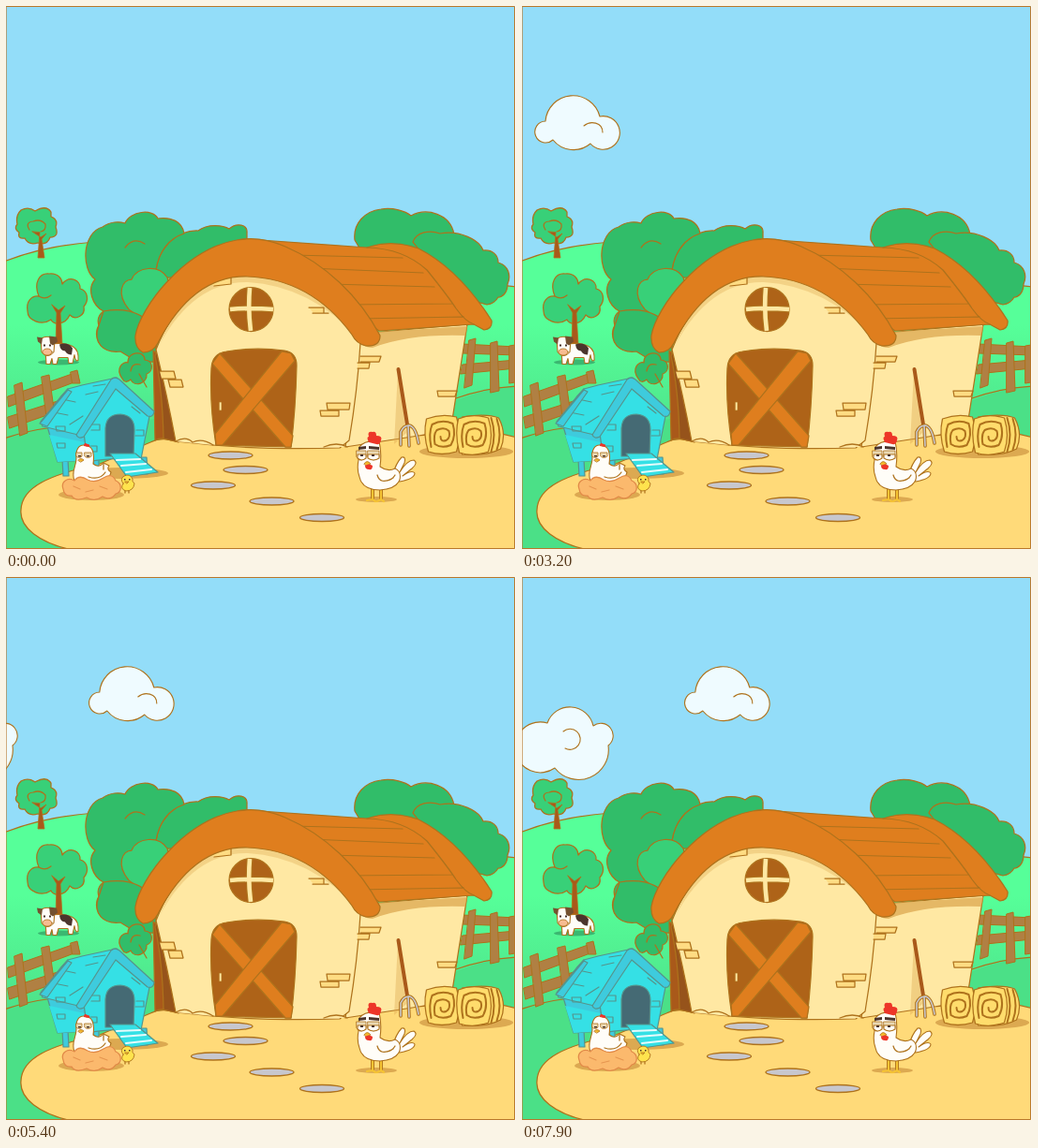
Write an HTML page that moves like this. It is 544x580 px and loops after 8 s.

```html
<!DOCTYPE html>
<html lang="en">
<head>
<meta charset="utf-8">
<title>Farm</title>
<style>
html, body { margin: 0; height: 100%; overflow: hidden; background: #93ddf9; }
svg { display: block; width: 100vw; height: 100vh; stroke: #ae721c; stroke-width: 1.25; stroke-linejoin: round; stroke-linecap: round; fill: none; }
.flat { stroke: none; }
.cloud { fill: #effbff; stroke-width: 1.1; }
.leaf { fill: #31bd69; }
.light { fill: #38d078; }
.wood { fill: #b08043; stroke-width: 1; }
.trunk { fill: #a9591a; }
.wall { fill: #ffe8a3; }
.brick { fill: #ffdc83; }
.roof { fill: #df7e1e; }
.dark { fill: #ae6318; }
.shade { fill: #dca951; stroke: none; }
.stone { fill: #c7c7ce; stroke-width: 1.4; }
.hay { fill: #ffdc6c; }
.white { fill: #fffdf8; stroke-width: 1.1; }
.coop { stroke: #55948c; stroke-width: 1.2; }
.aqua { fill: #35e0e5; }
.teal { fill: #3ecbdd; }
.red { fill: #ed3528; stroke: none; }
.beak { fill: #f5b82d; stroke-width: .8; }
.ink { fill: #4b352d; stroke: none; }
.lid { fill: #ead9b4; stroke-width: .8; }
</style>
</head>
<body>
<svg viewBox="0 0 544 580">
  <defs>
    <linearGradient id="hill" x1="0" y1="340" x2="0" y2="460" gradientUnits="userSpaceOnUse">
      <stop stop-color="#56ff99"/><stop offset="1" stop-color="#4ee28a"/>
    </linearGradient>
  </defs>
  <rect class="flat" width="544" height="580" fill="#93ddf9"/>

  <g id="near" class="cloud">
    <path d="M25 123A29.5 29.5 0 0 1 83 118A17.8 17.8 0 1 1 73 147A28 28 0 0 1 33 143A11.5 11.5 0 1 1 25 123Z"/>
    <path d="M66 128C73 122 86 124 86 135"/>
  </g>
  <g id="far" class="cloud">
    <path d="M27 156A25.5 25.5 0 0 1 76 159A12.7 12.7 0 1 1 92 180A32 32 0 0 1 35 204A27 27 0 1 1 27 156Z"/>
    <path d="M44 165A11 11 0 1 1 46 183"/>
  </g>

  <!-- hills -->
  <path fill="url(#hill)" d="M-2 273Q40 256 95 252L544 300V590H-2Z"/>
  <path fill="#4be087" d="M-2 462Q20 454 50 450L170 440V590H-2ZM470 425Q510 408 546 406V480H470Z" class="flat"/>
  <path d="M-2 462Q20 454 50 450M480 419Q510 408 546 406"/>

  <!-- small trees -->
  <path class="light" d="M14 242Q8 238 12 233Q10 224 16 218Q24 214 31 219Q43 212 48 220L48 225Q56 228 53 236Q57 247 47 247Q44 256 34 253Q24 256 20 248Q12 249 14 242Z"/>
  <path d="M25 239Q20 231 29 230Q37 227 42 233Q43 240 37 241"/>
  <path class="trunk" d="M36 242L34 269H41L38 249L43 243L37 247L28 241Z" stroke-width=".8"/>
  <path class="light" d="M35 310C29 295 36 285 46 286C56 285 60 292 60 297C68 287 80 293 79 302C87 304 89 314 83 321C85 331 74 336 68 330C63 341 51 341 48 335C38 342 23 336 23 326C21 316 27 309 35 310Z"/>
  <path d="M35 310Q42 314 48 309"/>
  <path class="trunk" d="M54 328L53 362H60L58 328L63 320L56 325L49 319Z" stroke-width=".8"/>

  <!-- bushes -->
  <path class="leaf" d="M160 282C163 256 185 239 205 240C215 232 232 234 238 238C246 231 258 233 257 243V290H160Z"/>
  <path class="leaf" d="M104 326C92 320 86 302 95 292C80 281 81 242 103 236C111 230 121 230 127 232C132 219 157 216 162 227C176 225 188 230 190 243C174 248 163 262 160 282V365H120C100 372 92 352 99 341Q96 332 104 326Z"/>
  <path d="M127 258Q136 246 148 254"/>
  <path class="light" d="M131 324C117 307 124 292 134 292C140 278 163 276 172 290L180 320L150 350Q142 330 131 324Z"/>
  <path class="leaf" d="M99 341C92 360 104 371 122 369L140 380H160V345Q140 319 104 326Z"/>
  <path class="leaf" d="M124 398C116 387 125 379 130 381C129 369 148 367 148 378C158 379 157 391 150 393C151 403 137 408 133 399Q127 404 124 398Z"/>
  <path d="M133 390Q134 381 143 383M142 393L150 407"/>
  <path class="leaf" d="M372 250C370 232 383 219 400 217C413 215 426 219 432 224C449 215 474 222 478 244L460 280H390Z"/>
  <path class="leaf" d="M434 252C438 241 452 239 463 243C484 239 505 250 509 261C519 260 525 266 525 274C536 277 539 288 535 297C535 307 529 311 525 311Q521 318 513 319L480 310Z"/>

  <!-- fences -->
  <g class="wood">
    <path d="M2 417L76 391L78 400L3 428ZM2 439L58 421V432L4 451Z"/>
    <path d="M9 405L17 402L23 456L15 459ZM38 396L46 394L51 430L43 436ZM69 391L76 389L79 403H71Z"/>
    <path d="M487 361L544 364V373L487 371ZM487 383L544 378V387L485 393Z"/>
    <path d="M494 357L501 355L497 405L489 408ZM517 360L524 358L526 411L517 413ZM537 363L543 362V402L537 403Z"/>
  </g>

  <!-- cow -->
  <g transform="translate(0 1.5)">
    <ellipse class="flat" cx="56" cy="379" rx="22" ry="3" fill="#3bb771"/>
    <path class="white" d="M46 360Q60 357 71 362Q78 366 77 377Q74 379 73 371L71 380H67L66 374H56L54 381H50L49 375L47 381H43L42 366Z"/>
    <path class="ink" d="M57 360Q66 357 71 364L70 371Q65 371 63 367Q58 367 57 360Z"/>
    <path class="white" d="M37 354Q45 349 52 355L51 368Q44 376 38 368Z"/>
    <path fill="#74512f" class="flat" d="M33 352L39 353L38 360L34 357ZM46 351L54 352L55 357L50 361L47 359Z"/>
    <ellipse cx="44" cy="368" rx="5" ry="3.5" fill="#f7bc91" stroke-width=".8"/>
    <path class="ink" d="M40 360h2v2h-2zM46 360h2v2h-2z"/>
  </g>

  <!-- ground -->
  <path fill="#ffda79" d="M75 582C34 574 14 556 16 538C17 514 45 501 100 489L154 466Q166 460 181 465L365 462L478 445L546 461V582Z"/>

  <!-- barn -->
  <path class="trunk" d="M157 368L165 375L176 464Q166 460 159 464Z"/>
  <path fill="#96531b" d="M161 368L184 466L168 462Q167 410 159 374Z"/>
  <path class="wall" d="M378 350L492 340L476 442Q463 457 440 459L362 471Z"/>
  <path class="shade" d="M379 358L398 348L492 342L490 352Q430 350 391 365Q378 364 379 358Z" opacity=".75"/>
  <path class="wall" d="M160 367Q192 287 257 288Q341 292 378 360Q375 410 366 464L356 472Q275 474 220 469L181 465Q172 417 160 367Z"/>
  <path class="shade" d="M164 361Q195 290 257 289Q336 294 376 355Q325 299 258 295Q201 294 164 361Z" opacity=".35"/>
  <path class="wall" d="M181 465Q192 459 199 466Q209 461 221 469M339 471Q353 465 364 471"/>
  <g class="brick">
    <path d="M213 293L240 290V297L222 299M323 322H339V328H328M327 328H344"/>
    <path d="M164 390H179L181 398H166M173 399H187L189 407H175ZM167 398H174"/>
    <path d="M342 424H367L366 431H343ZM335 432H355V438H336Z"/>
    <path d="M378 374H400L398 380H378M375 381H388L387 387H375M460 411H481L479 417H461ZM471 417H478"/>
  </g>
  <path class="roof" d="M257 249L385 258Q411 249 440 259Q483 281 518 336Q519 345 510 346L499 340L398 347Z"/>
  <path d="M385 258Q424 259 449 282Q470 308 480 323Q490 337 499 340M306 266L423 269M323 280L445 285M345 297L457 300M362 319L476 318M376 334L488 332"/>
  <path class="roof" d="M257 249L246 250C190 260 143 322 138 352Q137 365 146 370Q157 370 162 360Q199 288 257 289Q325 291 369 351Q374 361 384 363Q399 364 399 352C377 310 340 275 298 257Q271 245 246 250Z"/>
  <circle class="dark" cx="261.5" cy="324" r="23.5"/>
  <path d="M260 301Q258 324 261 347M239 324Q260 322 285 324" stroke-width="7" stroke-linecap="butt"/>
  <path d="M260 301Q258 324 261 347M239 324Q260 322 285 324" stroke="#ffe8a3" stroke-width="4.6" stroke-linecap="butt"/>
  <path class="dark" d="M224 469Q217 425 219 387Q220 371 235 369Q265 364 297 368Q310 370 310 384Q309 430 304 471Z"/>
  <path class="roof" d="M220 382L228 371L306 459L304 471H298Z"/>
  <path class="roof" d="M294 369L304 371L308 379L231 469H224L223 457Z"/>
  <path class="wall" d="M227.500 423H230V432H227.500Z" stroke-width=".7"/>

  <!-- pitchfork -->
  <path class="shade" d="M418 390L414 468L427 456Z" opacity=".4"/>
  <path d="M418.500 388L428 447" stroke="#a9591a" stroke-width="4"/>
  <path d="M421 469V455Q424 448 430 448Q437 449 440 467M429 448L430 470" stroke-width="3.600"/>
  <path d="M421 469V455Q424 448 430 448Q437 449 440 467M429 448L430 470" stroke="#c7c7ce" stroke-width="1.600"/>

  <!-- hay -->
  <ellipse class="shade" cx="491" cy="476" rx="50" ry="7"/>
  <g class="hay" transform="translate(.5 1)">
    <path d="M486 438Q512 434 525 439Q534 456 527 472Q512 480 486 478Z"/>
    <path d="M517 439Q523 457 517 475M523 440Q529 457 523 473" stroke-width="2"/>
    <path d="M448 440Q464 434 480 438Q486 457 480 475Q464 480 450 475Q444 457 448 440Z"/>
    <path d="M482 440Q497 434 514 439Q520 458 514 475Q498 481 483 476Q478 456 482 440Z"/>
    <path id="roll" d="M453 470Q450 456 454 446Q465 440 476 445Q480 458 474 468Q464 472 457 467Q455 457 459 452Q467 448 472 453Q474 460 469 463Q463 465 463 459" stroke-width="2"/>
    <use href="#roll" x="34"/>
  </g>

  <!-- stepping stones -->
  <g class="stone">
    <ellipse cx="239.500" cy="480" rx="23.500" ry="4"/>
    <ellipse cx="255.500" cy="495.500" rx="23.500" ry="4"/>
    <ellipse cx="221" cy="512" rx="23.500" ry="4"/>
    <ellipse cx="283.500" cy="529" rx="23.500" ry="4"/>
    <ellipse cx="337" cy="546.500" rx="23.500" ry="4"/>
  </g>

  <!-- coop -->
  <ellipse class="shade" cx="122" cy="499" rx="51" ry="6"/>
  <g class="coop">
    <path class="teal" d="M60 484H66L67 502H61ZM144 482H150L151 500H146ZM93 481H99V499H94Z"/>
    <path class="teal" d="M44 449L84 457L87 485L55 487Z"/>
    <path class="aqua" d="M46 458L84 466L87 485L55 487Z" stroke="none"/>
    <path class="aqua" d="M83 456L115 406L153 438L144 484Q111 482 87 487Z"/>
    <path class="aqua" d="M37 444L66 409L81 405L118 397L83 454L77 458L39 449Z"/>
    <path d="M66 409Q52 423 43 441M51 434L66 437M60 420L74 423M85 415L98 412M93 406L106 404M68 447L82 438"/>
    <path class="teal" d="M36 446L66 410L70 412L44 449ZM75 458L112 399Q116 395 121 399L158 433Q157 440 151 438L117 409L83 460Q77 463 75 458Z"/>
    <path d="M53 449H63V454H54ZM54 467H63V472H55ZM92 447H100V453H91M134 428L143 435M139 453H147V459H138M90 470H97V476H91"/>
    <path fill="#456a74" d="M106 481V451Q107 436 122 436Q137 437 137 453L136 481Z"/>
    <path class="aqua" d="M111 478L138 478L162 498L129 503Z"/>
    <path d="M118 485L143 484M123 491L149 489M128 498L155 495" stroke="#e5fbfb" stroke-width="2"/>
  </g>

  <!-- hen on nest -->
  <ellipse class="shade" cx="91" cy="522" rx="35" ry="6"/>
  <path class="white" d="M73 507C69 498 75 492 75 483C74 471 80 467 86 470C94 470 94 482 93 489Q99 494 104 488L110 491Q107 495 112 498Q109 510 96 510Z"/>
  <path d="M88 503Q100 507 106 498M104 489V495"/>
  <path class="red" d="M83 470Q83 465 87 468Q90 468 89 471Z"/>
  <path class="lid" d="M75 477H81V481Q78 484 75 481ZM84 477H91V481Q87 484 84 481Z"/>
  <path class="ink" d="M77 480h3v1.500h-3zM86 480h3v1.500h-3z"/>
  <path class="beak" d="M77 485Q80 482 83 485L80 487Z"/>
  <path fill="#fbb96d" stroke="#e18a48" d="M61 516C58 508 66 503 73 507Q78 500 87 506Q95 510 104 504Q113 498 117 507C124 510 124 519 117 521Q111 529 103 524Q95 530 86 525Q74 530 70 523Q62 524 61 516Z"/>
  <path d="M72 513L79 516M85 519L93 517M100 513L108 516" stroke="#e69650"/>

  <!-- chick -->
  <path d="M127 516V520M131 516V520"/>
  <path fill="#ffe34e" stroke-width=".9" d="M125 510Q121 505 126 502Q132 499 135 505Q134 508 137 510Q136 518 128 518Q121 516 125 510Z"/>
  <path class="ink" d="M126 505h1.500v1.500h-1.500zM131 505h1.500v1.500h-1.500z"/>
  <path class="beak" d="M127 508L131 508L129 510Z"/>

  <!-- rooster -->
  <ellipse class="shade" cx="395" cy="527" rx="22" ry="3"/>
  <path d="M391 514V526M400 514V526" stroke-width="4"/>
  <path d="M391 514V526M400 514V526M391 527L385 528M391 527L394 529M400 527L396 529M400 527L403 529" stroke="#f5c333" stroke-width="2.200"/>
  <path class="white" d="M412 502Q416 488 422 482Q427 481 425 488L420 498Q428 485 435 485Q440 488 433 494L423 502Q433 495 436 499Q436 505 420 508Z"/>
  <path class="white" d="M377 471Q383 463 398 465Q401 477 399 492Q407 498 415 494Q422 497 420 506Q416 516 399 517Q380 517 377 503Q374 495 376 485Z"/>
  <path d="M396 501Q399 512 413 504M407 507Q412 506 415 501"/>
  <path class="red" d="M387 466Q384 460 387 460Q385 454 391 455Q395 454 395 459Q402 459 400 464Q399 469 395 468Z"/>
  <path class="lid" d="M374 475H384V482Q379 488 374 482ZM386 475H398V482Q392 488 386 482Z"/>
  <path class="white" d="M375 479H384V483Q379 487 375 483ZM386 479H398V483Q392 487 386 483Z" stroke-width=".8"/>
  <path class="ink" d="M376 471L384 470V473L376 474ZM387 470L398 471V474L387 473ZM378 479h3v2h-3zM390 479h3v2h-3z"/>
  <path class="beak" d="M382 489Q385 484 389 489L385 491Z"/>
  <path class="red" d="M383 491Q387 488 391 491Q391 496 387 495Q383 495 383 491Z"/>

  <!-- frame -->
  <path class="flat" fill="#fff" d="M543 0H544V580H543Z"/>
  <rect x=".5" y=".5" width="542" height="579" stroke="#b9782b" stroke-width="1"/>
</svg>
<script>
const near = document.getElementById("near");
const far = document.getElementById("far");
const LOOP = 8000, STEP = 100, SPEED = 0.034; // ms, ms, px per ms

// Each cloud is drawn where it stands at the time "home".
const drift = (cloud, t, home) =>
  cloud.setAttribute("transform", `translate(${(SPEED * (t - home)).toFixed(2)} 0)`);

function draw() {
  const t = Math.floor(performance.now() % LOOP / STEP) * STEP;
  drift(near, t, 3200);
  drift(far, t, 7900);
  requestAnimationFrame(draw);
}
draw();
</script>
</body>
</html>
```
